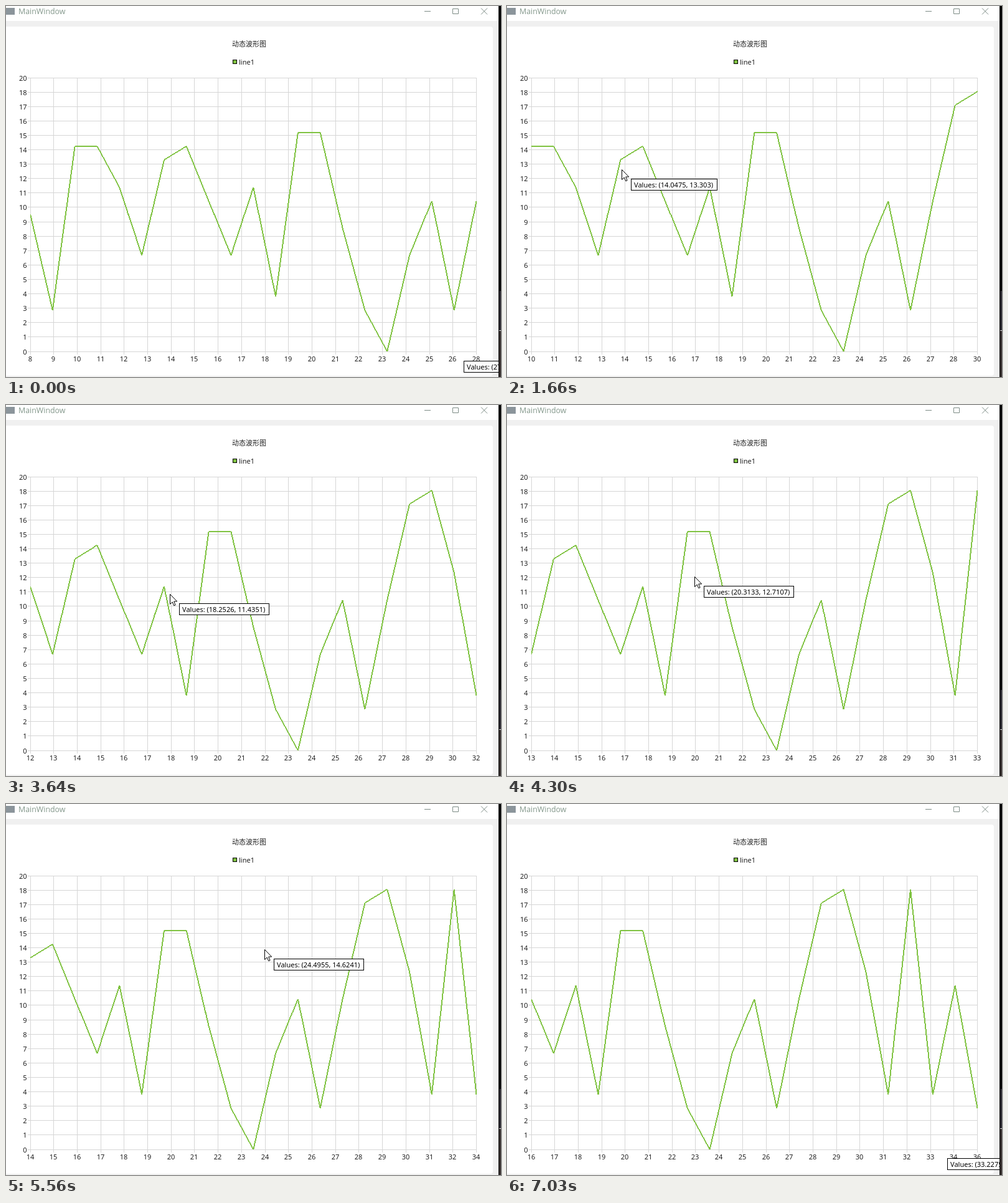
Write an HTML page with a canvas that moves like this. It is 795 px wide and 595 px high and loops after 7.15 s.

```html
<!DOCTYPE html>
<html lang="zh">
<head>
<meta charset="utf-8">
<title>MainWindow</title>
<style>
html, body { margin: 0; width: 100%; height: 100%; overflow: hidden; background: #f0f0f0; }
canvas { display: block; }
</style>
</head>
<body>
<canvas id="stage" width="795" height="595"></canvas>
<script>
const g = document.getElementById('stage').getContext('2d');
const LOOP = 7150, FIRST = 8, SPAN = 20, TICKS = 19;
const L = 39, B = 554, W = 716.5, H = 439;
const FONT = '11px "Noto Sans", "Open Sans", sans-serif';
const GRID = '#d6d6d6', GREEN = '#80c342', INK = '#7d8c86';

// plotted values, one per unit from x = FIRST
const values = [10, 3, 15, 15, 12, 7, 14, 15, 11, 7, 12, 4, 16, 16, 9,
  3, 0, 7, 11, 3, 11, 18, 19, 13, 4, 19, 4, 12, 3];

// pointer turning points: time, x, y
const path = [
  [0, 720, 554], [940, 126, 309], [1210, 166, 299], [1930, 199, 232],
  [2380, 208, 238], [3640, 263, 303], [4060, 294, 304], [4720, 317, 208],
  [4990, 312, 206], [6160, 544, 266], [6640, 692, 553]
];
const END = path[path.length - 1][0];
const arrowShape = new Path2D('M.5 .5v16l3.7-3.5 2.5 5.7 2.4-.9-2.4-5.8h5z');

// the line scrolls one unit at a steady beat; the axis follows a moment later
const lineMin = t => FIRST + 1 + Math.floor((t - 70) / 984);
const axisMin = t => lineMin(t - 60);

function rect(x, y, w, h, color) {
  g.fillStyle = color;
  g.fillRect(x, y, w, h);
}

function text(s, x, y, align = 'left', color = '#202020', font = FONT) {
  g.font = font;
  g.textAlign = align;
  g.fillStyle = color;
  g.fillText(s, x, y);
}

function windowFrame() {
  rect(0, 0, 795, 595, '#f0f0f0');
  rect(0, 0, 791, 24, '#fff');
  rect(0, 3, 14, 11, '#8b959b');
  text('MainWindow', 20, 13, 'left', '#84988c', '12.4px "Open Sans", "Noto Sans", sans-serif');
  g.strokeStyle = INK;
  g.lineWidth = 1;
  g.stroke(new Path2D('M672 8.5h10M717.5 4.5h9v8h-9zM763 3.5l10 10M773 3.5l-10 10'));

  g.fillStyle = '#fff';
  g.beginPath();
  g.roundRect(-6, 33, 788, 560, 4);
  g.fill();
  text('动态波形图', 390.5, 65, 'center', '#202020', '11px "Noto Sans CJK SC", "Noto Sans CJK", sans-serif');
  rect(364, 86, 7, 7, '#000');
  rect(365, 87, 5, 5, GREEN);
  text('line1', 374, 94);
}

function rightEdge() {
  rect(791, 0, 4, 595, '#000');
  rect(792, 457, 3, 63, '#2b2930');
  rect(792, 520, 3, 1, '#ddd');
  rect(792, 521, 3, 74, '#383130');
}

function axes(min) {
  for (let k = 0; k <= TICKS; k++) {
    const x = Math.floor(L + k * W / TICKS);
    const y = Math.floor(B - k * H / TICKS);
    const v = Math.floor(k * SPAN / TICKS);
    rect(x, B - H, 1, H + 5, GRID);
    rect(L - 4, y, 721, 1, GRID);
    text(v, 33.5, y + 5, 'right');
    text(min + v, x, 570, 'center');
  }
}

// hard-edged line, two pixels thick
function segment([x0, y0], [x1, y1]) {
  const dx = x1 - x0, dy = y1 - y0;
  const steep = Math.abs(dy) > Math.abs(dx);
  const n = Math.ceil(Math.max(Math.abs(dx), Math.abs(dy)));
  for (let i = 0; i < n; i++) {
    const p = (i + 0.5) / n;
    const x = x0 + dx * p, y = y0 + dy * p;
    if (steep) g.fillRect(Math.round(x) - 1, Math.floor(y), 2, 1);
    else g.fillRect(Math.floor(x), Math.round(y) - 1, 1, 2);
  }
}

function series(min) {
  g.save();
  g.beginPath();
  g.rect(L, B - H, 717, H + 1);
  g.clip();
  g.fillStyle = GREEN;
  values.slice(min - FIRST, min - FIRST + SPAN + 1)
    .map((v, i) => [L + i * W / SPAN, B - v * H / SPAN])
    .forEach((p, i, all) => i && segment(all[i - 1], p));
  g.restore();
}

// moves in small jumps, as a sampled pointer does
function pointer(t) {
  const i = path.findIndex(p => t < p[0]);
  if (i < 0) {
    const [time, x, y] = path[path.length - 1];
    return { time, x, y };
  }
  const a = path[i - 1], b = path[i];
  const n = Math.round((b[0] - a[0]) / 66);
  const p = Math.floor((t - a[0]) / (b[0] - a[0]) * n) / n;
  const [time, x, y] = a.map((v, k) => Math.round(v + (b[k] - v) * p));
  return { time, x, y };
}

function tooltip(m) {
  const vx = axisMin(m.time) + (m.x - L) / W * SPAN;
  const vy = (B - m.y) / H * SPAN;
  const label = `Values: (${+vx.toPrecision(6)}, ${+vy.toPrecision(6)})`;
  const x = m.x + 15, y = m.y + 15;
  g.font = FONT;
  const w = Math.round(g.measureText(label).width) + 12;
  rect(x, y, w, 19, '#000');
  rect(x + 1, y + 1, w - 2, 17, '#fff');
  text(label, x + 5, y + 14, 'left', '#000');
}

function arrow(m) {
  g.save();
  g.translate(m.x, m.y);
  g.fillStyle = '#fff';
  g.fill(arrowShape);
  g.strokeStyle = '#000';
  g.stroke(arrowShape);
  g.restore();
}

function draw(t) {
  const m = pointer(t);
  windowFrame();
  axes(axisMin(t));
  series(lineMin(t));
  tooltip(m);
  if (m.time > 0 && m.time < END) arrow(m);
  rightEdge();
}

const start = performance.now();
function tick() {
  draw((performance.now() - start) % LOOP);
  requestAnimationFrame(tick);
}
tick();
</script>
</body>
</html>
```
